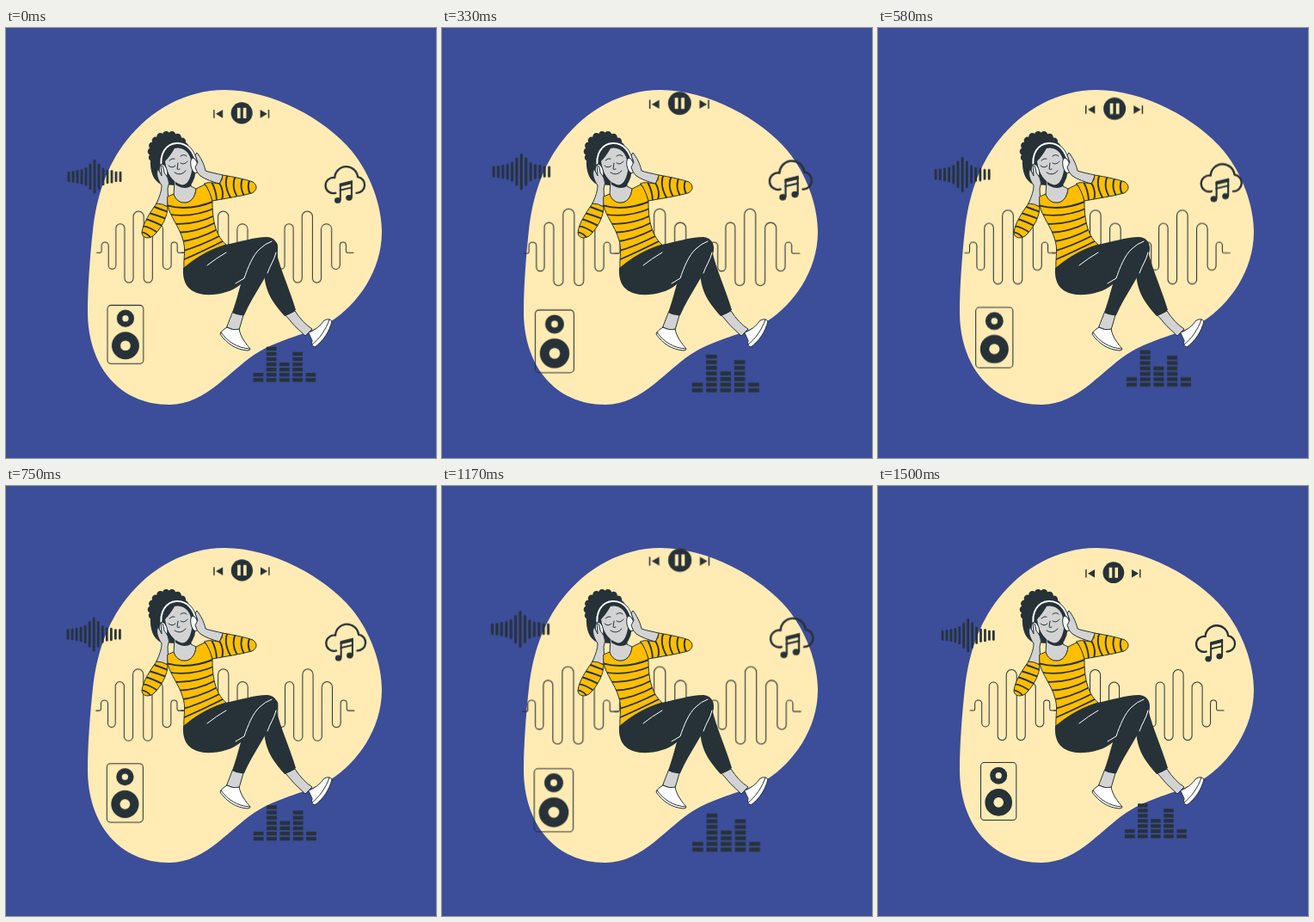
Write an HTML page that moves like this. It is 500 px wide and 500 px high and loops after 1540 ms.

```html
<!DOCTYPE html>
<html lang="en">
<head>
<meta charset="utf-8">
<title>Listening to music</title>
<style>
  html, body { margin: 0; width: 100%; height: 100%; overflow: hidden; background: #3c4d9a; }
  svg { display: block; width: 100%; height: 100%; }
  .dark { fill: #263238; }
  .cream { fill: #ffebb3; }
  .skin { fill: #d3d3d3; }
  .shirt { fill: #ffbe00; }
  .white { fill: #fff; }
  .ink { stroke: #263238; stroke-width: 1; stroke-linejoin: round; stroke-linecap: round; }
  .line { fill: none; }
  .thick { stroke-width: 2.3; }
  .stripe { stroke-width: 1.9; }
  .light { fill: none; stroke: #fff; stroke-width: 1; stroke-linecap: round; }
  #pulse { transform-origin: 245.5px 249px; animation: beat 1540ms linear infinite; }
  @keyframes beat {
    0% { transform: scale(1.012); }
    16.9% { transform: scale(1.1); }
    55.8% { transform: scale(1); }
    75.5% { transform: scale(1.1); }
    96.4%, 97.4% { transform: scale(1); }
    100% { transform: scale(1.012); }
  }
</style>
</head>
<body>
<svg viewBox="0 0 500 500">
  <defs>
    <path id="wave" d="M-48 261H-44Q-42.5 261 -42.5 259V253a4 4 0 0 1 8 0V275.7a4.25 4.25 0 0 0 8.5 0V233a5 5 0 0 1 10 0V290.5a5 5 0 0 0 10 0V219.5a6 6 0 0 1 12 0V290.5a5 5 0 0 0 10 0V234a6 6 0 0 1 12 0V275.3a4.75 4.75 0 0 0 9.5 0V252.5a3.5 3.5 0 0 1 7 0V259Q44.5 261 46 261H53"/>
    <path id="torso" d="M188 196L195 193C199 207 219 208 221 187L231 182C236 187 239 195 240 202C240 219 242 240 256 252C239 257 222 266 207 279C206 268 210 257 205 244C201 231 191 219 188 207Z"/>
    <path id="armL" d="M175 204Q182 204 188 208C188 219 181 232 173 240C168 246 158 245 158 238C159 227 168 214 175 204Z"/>
    <path id="armR" d="M231 181C236 178 244 181 248 181Q252 177 252 171C264 173 279 176 287 179C293 183 292 189 286 192C271 196 256 198 240 201C238 194 235 186 231 181Z"/>
    <clipPath id="inTorso"><use href="#torso"/></clipPath>
    <clipPath id="inL"><use href="#armL"/></clipPath>
    <clipPath id="inR"><use href="#armR"/></clipPath>
  </defs>

  <path class="cream" d="M254 72C310 72 371 106 402 143C424 170 437 207 437 237C437 283 408 322 378 341C349 357 318 362 295 376C262 395 234 438 190 438C131 438 95 392 95 330C95 300 98 262 101 235C105 197 117 160 140 131C168 95 210 72 254 72Z"/>

  <g id="pulse">
    <g class="line ink">
      <use href="#wave" x="155.2"/><use href="#wave" x="252.5"/><use href="#wave" x="349"/>
    </g>

    <g class="dark">
      <circle cx="273.8" cy="100.7" r="12.4"/>
      <path d="M241.2 97h1.4v9.4h-1.4zM252 97v9.4L244 101.7zM295 97v9.4L303 101.7zM304 97h1.4v9.4h-1.4z"/>
    </g>
    <path class="cream" d="M268.6 94.7h3.6v12h-3.6zM275.4 94.7h3.6v12h-3.6z"/>

    <g id="bars" class="dark"></g>
    <g id="levels" class="dark"></g>

    <rect class="line ink" x="119.5" y="321.5" width="41.3" height="67" rx="4"/>
    <g class="line" stroke="#263238">
      <circle cx="140.2" cy="336.6" r="6.8" stroke-width="6.4"/>
      <circle cx="140.2" cy="367.8" r="10.8" stroke-width="10"/>
    </g>

    <path class="line ink thick" d="M381.5 192.5A9 9 0 1 1 380.5 175A13.3 13.3 0 0 1 407 174A9.3 9.3 0 0 1 405.5 192.5"/>
    <path class="line ink" style="stroke-width:2" d="M387 200V183L400 179.5V197.5"/>
    <path class="dark" d="M386 181.5L401 177.8V181.8L386 185.5ZM386 188.5L401 185V187L386 190.5Z"/>
    <ellipse class="dark" cx="384" cy="201" rx="3.7" ry="3.4"/>
    <ellipse class="dark" cx="397" cy="198" rx="3.7" ry="3.4"/>
  </g>

  <g id="woman">
    <!-- far leg -->
    <path class="skin ink" d="M325 334L336 329Q345 343 356 350L348 358Q335 347 325 334Z"/>
    <path class="white ink" d="M352 354Q363 350 370 340Q376 337 379 341C376 353 369 364 359 371Q354 369 356 364Z"/>
    <path class="line ink" d="M376 339C372 351 364 362 356 368"/>
    <path class="dark" d="M314 259C319 281 330 304 337 328Q331 333 324 335C311 320 301 308 300 283Z"/>

    <!-- near leg -->
    <path class="skin ink" d="M264 330L276 334L271 351Q264 352 257 348Z"/>
    <path class="white ink" d="M257 348Q264 352 271 350C273 360 279 367 284 373Q284 375 281 375C267 374 257 367 249 356Q250 352 257 348Z"/>
    <path class="line ink" d="M250 354C258 365 269 372 283 373"/>
    <path class="dark" d="M206 279C220 266 239 256 255 252C272 249 288 243 304 243C315 244 318 254 315 263C304 289 288 309 277 334Q270 335 263 331C267 320 270 308 273 298C263 307 246 311 230 310C211 307 205 296 206 279Z"/>
    <path class="light" d="M234 276Q244 268 256 261M267 297L277 291C281 279 287 264 295 257Q301 251 309 248M314 261C312 270 307 276 304 285"/>

    <!-- hair, neck and face -->
    <ellipse class="dark" cx="189.5" cy="144" rx="21" ry="20"/>
    <g class="line" stroke="#263238" stroke-width="8.6" stroke-linecap="round">
      <circle cx="189" cy="144" r="20" stroke-dasharray="0 6.981"/>
    </g>
    <path class="dark" d="M168 152C167 166 171 178 181 182L213 184Q222 176 220 160C219 142 210 130 198 126Z"/>
    <path class="skin ink" d="M196 177L195 194C199 207 219 208 221 187L215 184V175Z"/>
    <path class="dark" d="M197 179L215 174V184Q207 189 197 182Z"/>
    <path class="skin" d="M185 155C189 151 193 145 196 140C203 138 211 142 214 150C217 159 217 168 213 176Q209 184 203 182C194 179 187 170 185 155Z"/>
    <g class="line ink">
      <path d="M189 160Q193 164 197 160M203 157Q207 160 211 155M190 154Q193 151 196 152M203 149Q207 146 210 149M200 157L199 164Q200 165 202 164M196 168Q203 173 209 166"/>
    </g>

    <!-- headphones -->
    <path class="line ink" style="stroke-width:3.4" d="M181 163C178 146 186 135 198 134C211 133 219 144 221 157"/>
    <path class="line" d="M181 163C178 146 186 135 198 134C211 133 219 144 221 157" stroke="#fff" stroke-width="2"/>
    <ellipse class="white ink" cx="183" cy="167" rx="4.500" ry="9" transform="rotate(-12 183 167)"/>
    <ellipse class="white ink" cx="219" cy="160" rx="4" ry="9" transform="rotate(-12 219 160)"/>

    <!-- arms -->
    <path class="skin ink" d="M175 204C179 195 181 189 181 183C176 176 174 168 177 164L181 172L180 160Q183 158 184 168L188 174Q191 180 188 187Q189 197 188 207Z"/>
    <path class="skin ink" d="M252 171C244 169 237 168 232 166C230 157 226 150 222 145L220 148L223 156L220 162Q222 169 226 172C232 176 240 179 248 181Z"/>

    <!-- striped top -->
    <use href="#torso" class="shirt"/>
    <g class="line ink stripe" clip-path="url(#inTorso)">
      <path d="M186 206Q212 214 243 201M186 216Q214 222 244 209M188 227Q217 231 245 217M194 238Q220 239 246 225M199 249Q222 247 248 233M203 260Q225 254 252 240M205 270Q226 261 256 246"/>
    </g>
    <use href="#torso" class="line ink"/>
    <use href="#armL" class="shirt"/>
    <g class="line ink stripe" clip-path="url(#inL)">
      <path d="M170 207Q180 211 192 215M166 215Q177 218 189 223M162 222Q173 225 185 232M157 230Q168 231 179 240M154 237Q164 237 170 246"/>
    </g>
    <use href="#armL" class="line ink"/>
    <use href="#armR" class="shirt"/>
    <g class="line ink stripe" clip-path="url(#inR)">
      <path d="M239 179Q245 190 245 202M248 180Q254 190 251 200M258 170Q252 182 262 199M267 172Q261 184 270 198M276 173Q270 184 278 197M284 176Q279 184 285 195"/>
    </g>
    <use href="#armR" class="line ink"/>
  </g>
</svg>
<script>
  const addRect = (id, x, y, width, height, rx = 0) => {
    const el = document.createElementNS("http://www.w3.org/2000/svg", "rect");
    for (const [k, v] of Object.entries({ x, y, width, height, rx })) el.setAttribute(k, v);
    document.getElementById(id).append(el);
  };

  [12, 13, 15, 17, 21, 30, 39, 30, 20, 16, 15, 12, 12].forEach((h, i) =>
    addRect("bars", 73.7 + i * 4.94, 173.8 - h / 2, 2.7, h, 1));

  [2, 7, 4, 6, 2].forEach((rows, col) => {
    for (let r = 0; r < rows; r++) addRect("levels", 287 + col * 15.05, 405.2 - r * 6, 11.5, 4.2);
  });
</script>
</body>
</html>
```
